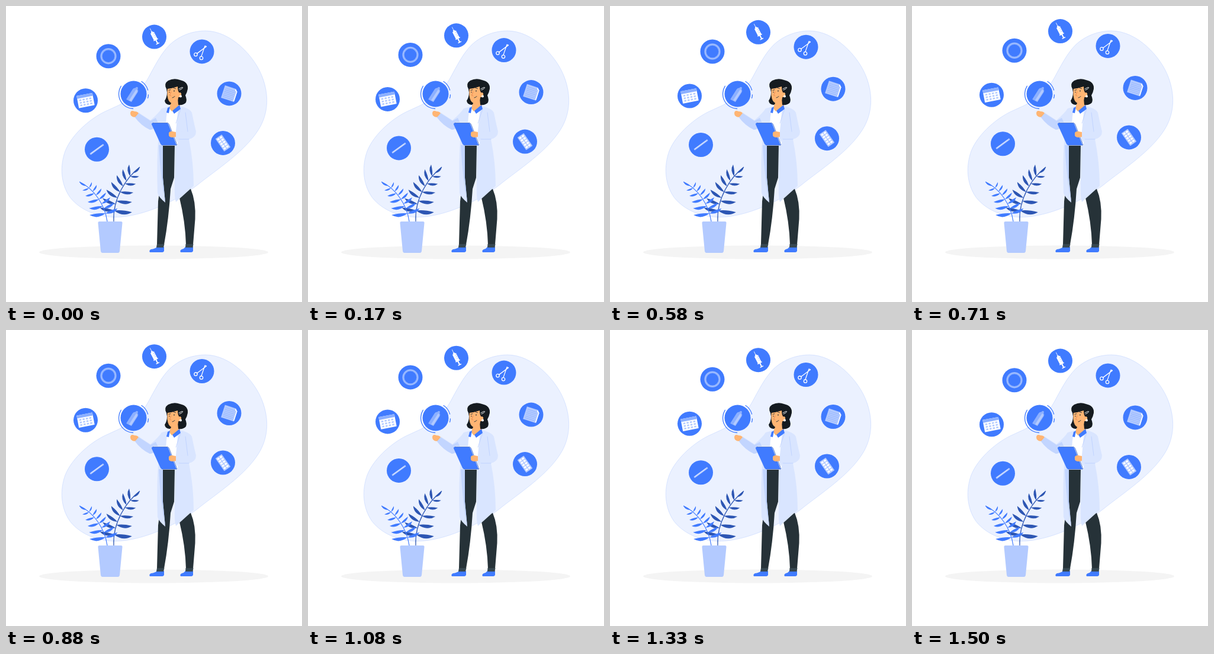
Recreate the animation shown at these times as an HTML page. Size 500 by 500 pixels, loop 1540 ms.

```html
<!DOCTYPE html>
<html lang="en">
<meta charset="utf-8">
<title>Doctor with floating icons</title>
<style>
html, body { margin: 0; height: 100%; overflow: hidden; background: #fff }
svg { display: block; width: 100vw; height: 100vh }
.blue { fill: #407bff }
.dark { fill: #263238 }
.hair { fill: #151b20 }
.skin { fill: #ffb573 }
.coat { fill: #d9e5ff }
.shade { fill: #c2d5ff }
.pale { fill: #b3caff }
.white { fill: #fff }
.line { fill: none; stroke-linecap: round; stroke-linejoin: round }
</style>
<svg viewBox="0 0 500 500">
  <path fill="#ebf1ff" stroke="#c3d5ff" stroke-width=".6" d="M337 42C380 42 420 85 433 120C445 152 442 180 430 203C410 240 365 270 330 297C300 322 250 348 205 355C160 362 125 345 108 323C92 300 91 270 100 245C112 215 145 188 170 177C200 163 220 157 240 122C252 100 262 80 276 66C295 48 318 42 337 42Z"/>
  <ellipse cx="249.5" cy="416" rx="193.5" ry="11.5" fill="#f4f4f4"/>

  <g id="plants"></g>
  <path class="pale" d="M158 364H194Q197 364 196.500 367L192 414Q191.500 417 189 417H163Q160.500 417 160 414L155.500 367Q155 364 158 364Z"/>

  <g id="woman">
    <path class="blue" d="M255 407H267V414Q266 416 264 416H243Q241 413 245 411Q252 410 255 407ZM303 407H316V414Q315 416 313 416H295Q293 413 297 411Q301 410 303 407Z"/>
    <path class="dark" d="M265 235H285L284 290L278 309Q275 360 267 403H255L257 330Q262 295 265 235ZM291 314L312 309Q321 330 319.500 360L316 403H304Q303 365 293 324Z"/>
    <path fill="#37474f" d="M255 402H267.500L266 408H254ZM303.500 402H316.500L315.500 408H303Z"/>
    <path class="coat" d="M271 171L291 169Q309 172 313 179L321 212Q321 222 309 225Q317 265 317 304L287 331Q284 322 285 300V234H265V290L269 332Q258 323 256 316Q254 260 258 215L259 199Q253 207 243 209Q229 203 217 187L224 180L244 193Q258 181 263 173Z"/>
    <path class="shade" d="M217 187L224 181L244 194L253 189L258 200Q249 209 243 209Q228 202 217 187ZM258 235H265V290L269 332Q261 290 258 235Z"/>
    <path class="white" d="M273 172L291 171L290 236H270Q268 202 273 172Z"/>
    <path class="coat" d="M291 169Q309 172 314 180L320 211Q321 223 307 225L285 223L287 213L304 212L301 190L286 240V222Z"/>
    <path class="skin" d="M279 160L292 154L294 170L280 178L276 173Z"/>
    <path class="blue" d="M273 172L277 170L275 181L271 180ZM293 167L295 174L284 182L281 177Z"/>
    <path class="hair" d="M271 140Q266 131 274 126Q284 121 294 125Q308 128 307 140Q306 146 303 151Q306 158 304 163Q300 168 291 167L290 155L279 160Q280 165 277 167Q269 167 268 160Q272 154 272 146Z"/>
    <path class="skin" d="M273 138Q283 138 290 134L293 146Q297 146 296 151Q294 155 291 154Q291 161 286 164Q279 166 275 160Q271 152 273 138Z"/>
    <path class="hair" d="M270 138Q281 137 290 130L297 136Q294 140 293 147Q290 144 290 136Q281 139 272 140Z"/>
    <g class="line" stroke="#263238" stroke-width=".9">
      <path d="M275 142.500L278 141.500M283 138.500L286.500 139.500M281 155Q284 154.500 285 152.500"/>
      <path stroke="#e98b50" d="M279 145L276.500 151L279 152"/>
      <path stroke="#fff" d="M292 140L297 137.500Q300 137 297.500 139.500L293 142"/>
    </g>
    <circle class="dark" cx="276" cy="145.500" r=".8"/><circle class="dark" cx="284" cy="143.500" r=".9"/>
    <circle class="white" cx="295" cy="152.500" r="2"/>
    <path class="skin" d="M211 178Q213 176 217 178Q222 178 224 181L219 187Q215 189 211 185Q209 181 211 178Z"/>
    <path class="white" d="M249 196.500H275L290 234L288 236H265Z"/>
    <path class="blue" d="M247 198H272Q274 198 274.500 200L288 235H264Q262 235 261 233L246 200Q245.500 198 247 198Z"/>
    <path class="line" stroke="#2d5bc4" stroke-width=".8" d="M248 197.500H273Q275 198 276 201L289 235H264"/>
    <path class="skin" d="M275 214Q277 211 282 212L287 213V221L282 222Q275 222 275 218Z"/>
    <path class="line" stroke="#b7ccff" stroke-width=".7" d="M303 180L307 212M295 174L287 198M309 225H292"/>
  </g>

  <circle class="blue" cx="215.500" cy="148.500" r="22"/>
  <path class="line" stroke="#407bff" stroke-width="1.300" d="M194.300 135.300A25 25 0 0 0 214.600 173.500M229 127.500A25 25 0 0 1 239.600 142M240.500 150Q240.500 153 239.500 155.500"/>
  <g transform="translate(214.500 149)rotate(28)">
    <path fill="#8cb0ff" d="M-4.500 -7Q-4 -10 -1.500 -11Q-1 -14 1 -14Q3 -14 3 -11Q5.500 -10 5.500 -7L4 13H-6Z"/>
    <path class="pale" d="M1 -10Q4.500 -9 4.500 -6L3 12H-1Z"/>
  </g>

  <g id="icons"></g>
</svg>
<script>
// Each side of a plant runs from its lowest to its highest leaf; angles in degrees
const PLANTS = [
  { color: '#2d56b3', x: [182, 180, 203, 226], y: [364, 325, 290, 272], sides: [
    { count: 7, angle: [192, 265], size: [25, 20] },
    { count: 5, angle: [5, 0], size: [30, 15] }] },
  { color: '#407bff', x: [171, 167, 148, 124], y: [364, 335, 308, 297], sides: [
    { count: 5, angle: [174, 160], size: [27, 12] },
    { count: 7, angle: [-22, -65], size: [22, 11] }] }
];

const mix = ([a, b], u) => a + (b - a) * u;
const bezier = ([a, b, c, d], t) =>
  a * (1 - t) ** 3 + 3 * b * t * (1 - t) ** 2 + 3 * c * t * t * (1 - t) + d * t ** 3;

// Crescent of given direction and length, bulging downwards
function leaf(x, y, dx, dy) {
  const side = Math.sign(dx);
  const at = (along, out) => `${x + dx * along - dy * out * side} ${y + dy * along + dx * out * side}`;
  return `M${x} ${y}Q${at(.55, .34)} ${at(1, 0)}Q${at(.4, -.1)} ${x} ${y}Z`;
}

function drawPlant({ color, x, y, sides }) {
  const [baseX, baseY] = [bezier(x, .83), bezier(y, .83)];
  let leaves = leaf(baseX, baseY, x[3] - baseX, y[3] - baseY);
  for (const { count, angle, size } of sides)
    for (let i = 0; i < count; i++) {
      const u = i / (count - 1), t = .16 + .6 * u;
      const a = mix(angle, u) * Math.PI / 180, length = mix(size, u);
      leaves += leaf(bezier(x, t), bezier(y, t), length * Math.cos(a), length * Math.sin(a));
    }
  const stem = x.map((px, i) => `${px} ${y[i]}`);
  return `<path fill="none" stroke="${color}" stroke-width="1.2" d="M${stem[0]}C${stem.slice(1)}"/>
    <path fill="${color}" d="${leaves}"/>`;
}

plants.innerHTML = PLANTS.map(drawPlant).join('');

const repeat = (count, draw) => Array.from({ length: count }, (_, i) => draw(i)).join('');
const grid = (cols, rows, draw) => repeat(cols * rows, i => draw(i % cols, Math.floor(i / cols)));
const box = (x, y, w, h, fill) => `<rect x="${x}" y="${y}" width="${w}" height="${h}" rx=".7" fill="${fill}"/>`;

const ring = `<g fill="none"><circle r="12" stroke="#8cb0ff" stroke-width="3.4"/>
  <circle r="12.3" stroke="#b3caff" stroke-width=".7"/></g>`;
const syringe = `<path class="white" d="M-.4 -16H.4V-10H1.500V-8H3.300V5H4.200V6.300H1V12H3V13.500H-3V12H-1V6.300H-4.200V5H-3.300V-8H-1.500V-10H-.4Z"/>
  <path stroke="#8cb0ff" stroke-width=".6" d="M0 -5H3M0 -2H3M0 1H3"/>`;
const scissors = `<g class="line" stroke="#fff" stroke-width="1.3"><circle cx="-10.500" cy="5" r="2.700"/>
  <circle cx="-1" cy="11" r="2.700"/><path d="M-8.500 3.500L7.500 -8.500L5 -9.500L-1 8"/></g>`;
const note = `<path class="pale" d="M-11 -11H8L12 -7V11H-11Z"/><path class="white" d="M8 -11L12 -7V9L10.500 11V-7H8Z"/>` +
  repeat(6, i => box(-9, -7.3 + i * 3, 18, .7, '#8cb0ff'));
const blister = box(-6.5, -13, 13, 26, '#b3caff') +
  grid(2, 5, (x, y) => box(-4.8 + x * 5.4, -11.2 + y * 4.7, 4, 3.2, '#fff'));
const stick = box(-14, -1.4, 28, 2.8, '#b3caff') + box(-12, -.8, 23, 1, '#d9e5ff');
const calendar = box(-13.5, -10.5, 27, 21, '#fff') + box(-13.5, -10.5, 27, 5, '#8cb0ff') +
  grid(4, 3, (x, y) => box(-10.5 + x * 5.7, -3.5 + y * 4.4, 3.6, 2.6, '#b3caff'));

const icon = (x, y, turn, art) => `<g transform="translate(${x} ${y})">
  <circle class="blue" r="20.5"/><g transform="rotate(${turn})">${art}</g></g>`;

icons.innerHTML =
  icon(173, 85.1, 0, ring) +
  icon(250.5, 52.5, -27, syringe) +
  icon(331, 77.3, 0, scissors) +
  icon(377, 148.3, 18, note) +
  icon(366.5, 231.8, -35, blister) +
  icon(153.5, 242.6, -36, stick) +
  icon(134.5, 160.1, -11, calendar);

const LOOP = 1540, FLOAT = 1500, LEAD = 30, RISE = 10;

function frame() {
  const t = performance.now() % LOOP;
  const phase = (t + LEAD) % FLOAT / FLOAT;
  const lift = RISE * (1 - Math.abs(2 * phase - 1));
  icons.setAttribute('transform', `translate(0 ${-lift})`);
  requestAnimationFrame(frame);
}
frame();
</script>
</html>
```
